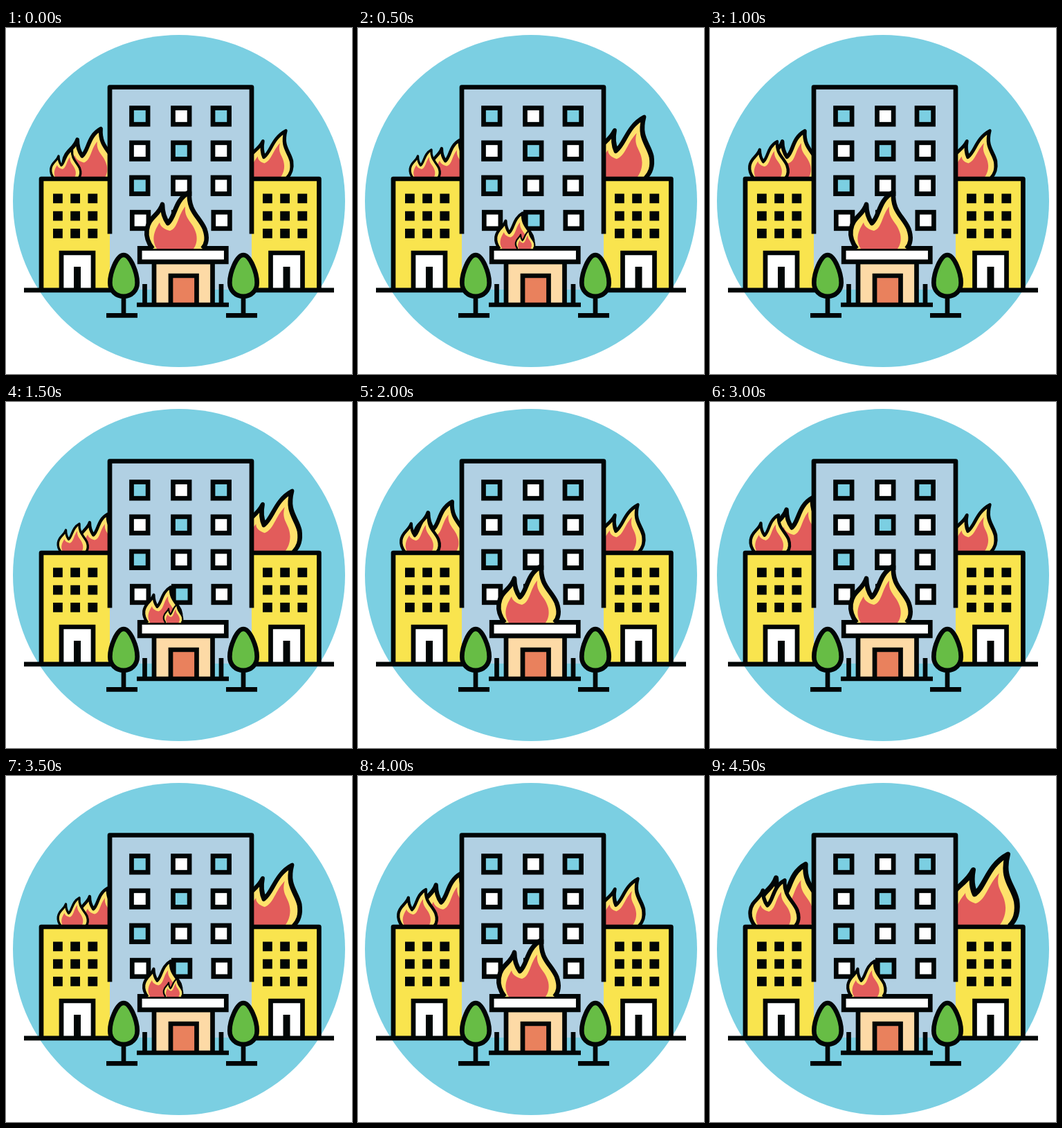
An HTML page for the animation above (5000 ms loop, 500 by 500 pixels).

```html
<!DOCTYPE html>
<html lang="en">
<head>
<meta charset="utf-8">
<title>Burning buildings</title>
<style>
  html, body { margin: 0; width: 100%; height: 100%; overflow: hidden; background: #fff; }
  svg { display: block; width: 100%; height: 100%; }
  .line { fill: none; stroke: #010606; stroke-width: 6.7; stroke-linejoin: round; }
  .sharp { stroke-linejoin: miter; }
  .yellow { fill: #f9e44e; }
  .white { fill: #fff; }
  .blue { fill: #7bcfe2; }
  .black { fill: #010606; }
  .green { fill: #67bd45; }
  .peach { fill: #fddaa6; }
  .orange { fill: #e9815d; }
  .red { fill: #e25c5b; }
  .glow { fill: #fee16b; }
</style>
</head>
<body>
<svg viewBox="0 0 500 500">
  <defs>
    <!-- Tip above x = 0, base on y = 0 -->
    <g id="flame">
      <path class="line glow" d="M-53 0C-60 -9 -62.5 -19 -61.5 -27C-59 -46 -44 -48 -39 -64C-39 -52 -36 -44 -31 -37C-20 -46 -22 -70 0 -82C-2 -54 14 -47 22 -29C27 -15 25 -7 19 0"/>
      <path class="red" d="M-47 0C-56 -14 -50 -27 -43 -38C-42 -32 -36 -28 -28 -26C-16 -30 -17 -48 -6 -61C-8 -42 6 -39 10 -21C12 -11 9 -4 6 0Z"/>
    </g>
    <g id="tree">
      <path class="line green" d="M0 328C10 328 19.7 354 19.7 368C19.7 380 11 387.8 0 387.8S-19.7 380 -19.7 368C-19.7 354 -10 328 0 328Z"/>
      <path class="line" d="M0 391V415M-25 415.3H20"/>
    </g>
    <g id="door">
      <path class="line sharp white" d="M-23 377V325H23V377"/>
      <path class="black" d="M-5 345H5V378H-5Z"/>
    </g>
  </defs>

  <circle class="blue" cx="250" cy="250" r="240"/>
  <g id="sideFlames"></g>

  <path class="yellow" d="M51 218H150V378H51ZM355 218H452.4V378H355Z"/>
  <path class="line" d="M51 378V218H150M355 218H452.4V378"/>
  <path id="smallWindows" class="black"/>
  <use href="#door" x="103"/>
  <use href="#door" x="405.5"/>
  <path class="line" d="M26 378.8H152M361 378.8H474"/>

  <path fill="#b1d0e3" d="M150 86H355V378H150Z"/>
  <path class="line" d="M150 297.5V85.5H355V297.5"/>
  <g id="windows"></g>

  <path class="line sharp peach" d="M214 400V338H298.5V400"/>
  <path class="line sharp orange" d="M238 400V358H275.5V400"/>
  <path class="line" d="M189 400H322M200.5 370V400M311 370V400"/>
  <path class="line sharp white" d="M193.2 318.3H318.3V337.8H193.2Z"/>
  <g id="doorFlames"></g>
  <use href="#tree" x="170"/>
  <use href="#tree" x="343"/>
</svg>
<script>
const STEP = 500, ROOF = 217, CANOPY = 319, TIP = 82;
const byId = id => document.getElementById(id);

const flameAt = (x, y, size) =>
  `<use href="#flame" transform="translate(${x} ${y}) scale(${size})"/>`;

// The right-hand flame leans around its tip.
const leaningFlame = (x, size) => {
  const lean = .19 * size;
  return `<use href="#flame" transform="matrix(${.93 * size} 0 ${-lean} ${size} ${x - lean * TIP} ${ROOF})"/>`;
};

// Each flame is [tip x, size].
const calm = { right: [404, .83], door: [[265, 1]] };
const flare = { back: [147, .67], front: [106, .5], right: [413, 1.07], door: [[238, .63], [247.5, .32]] };
const poses = [
  { ...calm, back: [137, .87], front: [95.5, .5] },
  flare,
  { ...calm, back: [137, .83], front: [97, .645] },
  flare,
  { ...calm, back: [136, .89], front: [102, .645] },
  flare,
  { ...calm, back: [148, .96], front: [99, .655] },
  flare,
  { ...calm, back: [149, .93], front: [98, .645] },
  { back: [138, 1.09], front: [108, .81], right: [430, 1.26], door: [[238, .63]] },
];

const three = [0, 1, 2];
byId('smallWindows').setAttribute('d', [68, 371].flatMap(left =>
  three.flatMap(col => three.map(row =>
    `M${left + col * 25.2} ${239.5 + row * 25.2}h13.8v13.8h-13.8z`))).join(''));

byId('windows').innerHTML = ['BWB', 'WBW', 'BWW', 'WBW'].map((panes, row) =>
  [...panes].map((pane, col) => {
    const x = [193.3, 253.3, 310.8][col] + (row === 3 ? .8 : 0);
    return `<rect class="line sharp ${pane === 'B' ? 'blue' : 'white'}" stroke-width="6"
      x="${x - 11.8}" y="${115.6 + row * 50.2}" width="23.6" height="23.6"/>`;
  }).join('')).join('');

let shown;
function draw() {
  const pose = poses[Math.floor((performance.now() - start) / STEP) % poses.length];
  if (pose !== shown) {
    shown = pose;
    byId('sideFlames').innerHTML =
      flameAt(pose.back[0], ROOF, pose.back[1]) +
      flameAt(pose.front[0], ROOF, pose.front[1]) +
      leaningFlame(...pose.right);
    byId('doorFlames').innerHTML = pose.door.map(([x, size]) => flameAt(x, CANOPY, size)).join('');
  }
  requestAnimationFrame(draw);
}
const start = performance.now();
draw();
</script>
</body>
</html>
```
